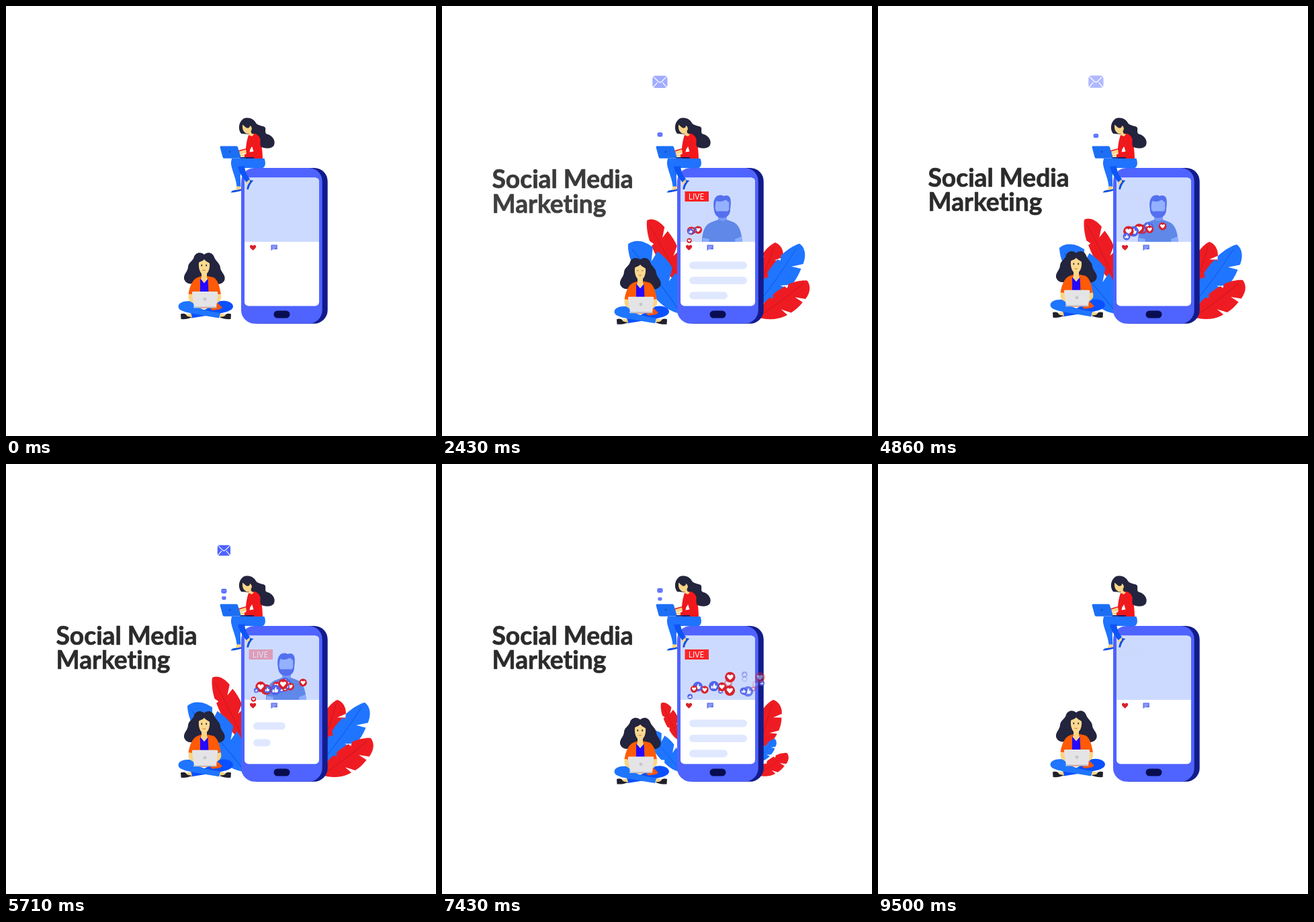
Write an HTML page that moves like this. It is 640 by 640 pixels and loops after 9.57 s.

```html
<!DOCTYPE html>
<html lang="en">
<head>
<meta charset="utf-8">
<title>Social Media Marketing</title>
<style>
html, body { margin: 0; width: 100%; height: 100%; overflow: hidden; background: #fff; }
svg { display: block; width: 100vw; height: 100vh; }
.title { font: 700 37.2px Lato, sans-serif; font-variant-ligatures: none; fill: #2b2b2b; stroke: #2b2b2b; stroke-width: .7; }
.live { font: 12px "Open Sans", sans-serif; fill: #fff; }
</style>
</head>
<body>
<svg viewBox="0 0 640 640">
  <defs>
    <clipPath id="photo"><path d="M355 351V262q0-6 6-6h99q6 0 6 6v89z"/></clipPath>
    <clipPath id="post"><rect x="355" y="351" width="111" height="95"/></clipPath>
    <path id="leafShape" d="M0 0C8-11 20-16 34-17L38-12L42-18C50-19 58-18 65-17L66-11L72-16C83-13 94-7 100 0C100 13 92 23 80 27L68 12L73 29C64 32 56 33 48 32L38 15L41 31C26 29 10 18 0 0Z"/>
    <path id="heart" d="M0 5.5C-4 2-6 0-6-2C-6-5-1.8-6 0-2.8C1.8-6 6-5 6-2C6 0 4 2 0 5.5Z"/>
    <path id="thumb" d="M-5.4-.6h2.8v5.2h-2.8zM-1.8 4V0L.4-5.6C2.6-5.6 2.3-2.6 1.8-1.2H4.8C5.8-1.2 5.8 0 5.4.8L4.2 4.6H-.8Z"/>
    <g id="like"><circle r="10" fill="#4f63ec"/><use href="#thumb" fill="#fff"/></g>
    <g id="love"><circle r="10" fill="#d9212c"/><use href="#heart" fill="#fff"/></g>
    <g id="mail">
      <rect x="-11" y="-9" width="22" height="18" rx="4.5" fill="#4f63ff"/>
      <path d="M-9-7L-2.4-.4Q0 1.6 2.4-.4L9-7M-9.5 7.5L-4 1M9.5 7.5L4 1" fill="none" stroke="#fff" stroke-width="1.2"/>
    </g>
  </defs>

  <g id="leaves"></g>

  <g id="phone">
    <rect x="356" y="241" width="122.7" height="231.7" rx="20" fill="#121b8c"/>
    <rect x="350" y="241" width="120.7" height="231.7" rx="20" fill="#4f63ff"/>
    <rect x="355" y="255.6" width="111" height="191" rx="6" fill="#fff"/>
    <path d="M355 351V262q0-6.4 6-6.4h99q6 0 6 6.4v89z" fill="#cddaff"/>
    <rect x="398.5" y="453.5" width="24" height="11" rx="5.5" fill="#080d50"/>
  </g>

  <g clip-path="url(#photo)"><g id="man">
    <path d="M387 352C387 334 392 324 403 321L411 318H424L432 321C442 324 446 336 447 352Z" fill="#5f88e8"/>
    <path d="M387.500 352L388.500 345L398 347L397.500 352ZM436.500 352L436 347L446 343L447 352Z" fill="#8aabff"/>
    <path d="M411 308H424V317C422 321 413 321 411 317Z" fill="#7898f5"/>
    <path d="M405.500 288H428.500V304C428 311 423 315 417 315C411 315 406 311 405.500 304Z" fill="#93b1ff"/>
    <path d="M404.800 303C403.500 294 404 288 408 284C411 281 416 281 419 283C423 281 428 282 429.300 287C430.500 293 429.500 298 429 303C429 309 426 315 417 315.500C408 315 405.500 309 404.800 303ZM406.800 302C407.500 306 410 306 412 305.500H422C424 306 426.500 306 427.300 302V292C424 291 424 288 421 289C416 292 411 291 408.500 290C407 293 406.500 297 406.800 302Z" fill="#5470ee" fill-rule="evenodd"/>
  </g></g>

  <g id="live">
    <rect x="361.500" y="276" width="35.500" height="15" fill="#fb2024"/>
    <text class="live" x="366.800" y="287.800">LIVE</text>
  </g>

  <g id="bars" clip-path="url(#post)" fill="#dfe8ff"></g>

  <use href="#heart" transform="translate(367.600 359.500) scale(.77)" fill="#d9202a"/>
  <path d="M394.500 355.500h9.300v6.800h-7l-2.300 2z" fill="#5a6cf0"/>
  <path d="M396 357.500h6.500M396 359.300h6.500M396 361h4.500" stroke="#cfd8ff" stroke-width=".7"/>

  <g id="reactions"></g>
  <g id="mails"></g>

  <g id="climber">
    <path d="M362 191C366 187 375 188 378 195C380 204 382 215 382 228H357C358 215 358 202 362 191Z" fill="#fb1519"/>
    <path d="M361 192C358.500 199 357.500 207 357 212L346 215L347 220L362 218L367 205L369 218L354 221L355 225L374 224C377 215 375 204 372 195Z" fill="#ee191d"/>
    <path d="M363.500 213L366.200 209L368.500 216.500L362.500 217.500Z" fill="#fff"/>
    <path d="M350 190C345 184 346 173 353 168C359 165 367 167 371 172.500C373 178 381 178 385 180C388 183 384 188 388 190.500C395 192 402 199 399 207C396 213 384 213 379 209C377 203 381 198 375 192.500C370 188 367 190 363 191Z" fill="#23243d"/>
    <path d="M352 176.500L358 181.500C361 182 363 181 363 178C366 179 367 184 364.500 186L365 189L369 191.500L366 194L362 192.500L361 190C356 191 351 186 352 176.500Z" fill="#f9d587"/>
    <path d="M352 177C350 182 353 188 358 190C352 191 347.500 185 347.500 178Z" fill="#23243d"/>
    <path d="M336 227H384.500C387 233 386.500 241 380 241.500L354 241C347 246 349 258 349.500 269L343.500 269C342 254 334 240 335 232Z" fill="#1f73ff"/>
    <path d="M345 239L355 238.500C356 248 360 254 363.500 258L357.800 262.500C352 255 347 248 345 239Z" fill="#0d55f5"/>
    <path d="M343.500 268.500H349.500L350 273L340 275.500C342 273 343 271 343.500 268.500ZM357.500 262.500L363 257.500L364 260L360 267.500Z" fill="#f9d587"/>
    <path d="M334.500 277.500C336 274.500 340 273.500 343 274L350 272.500V275C346 276 340 278 334.500 277.500ZM358.500 273C358.500 269 360 264.500 363 262L362.800 259L368.500 260C365 262 362 268 361 273Z" fill="#0b4fe0"/>
    <path d="M347 216.500L357 213.500L358 218.500L348 220.500ZM347.500 224L349 220.500L355 221L355 224.500Z" fill="#f9d587"/>
    <path d="M348 225H369V226.800H348Z" fill="#0d1c70"/>
    <path d="M320 208.500H343Q344.500 208.500 345 210L349.500 225Q349.500 226.800 348 226.800H324.500Q323 226.800 322.500 225L318.500 210Q318.500 208.500 320 208.500Z" fill="#1c6ff5"/>
    <circle cx="333" cy="217" r="1.500" fill="#1550c4"/>
  </g>

  <g id="sitter">
    <path d="M295 370C290 365 282 367 280 373C279 379 272 381 271 388C271 395 264 399 265 406C267 413 275 416 282 411L295 406L308 411C315 417 324 413 325.500 407C327 400 320 396 319 390C319 383 312 380 310 374C308 367 300 365 295 370Z" fill="#23243d"/>
    <path d="M285 404L291 402H300L309 404C316 408 318 419 320 429H312L311 450H279V430L271.500 429C273 420 276 408 285 404Z" fill="#ff5a05"/>
    <path d="M289 405L295 411L300.500 405L301.500 427H289Z" fill="#2408ff"/>
    <path d="M291 397H299V404L300.500 406L295 412.500L289.500 406L291 404Z" fill="#f9d587"/>
    <path d="M287 382C289 380 293 380 295 377C297 380 301 381 303 383C304 392 300 400 295 400.500C290 400 286 392 287 382Z" fill="#fbd98f"/>
    <path d="M292.500 393Q294.700 394.300 297 393" fill="none" stroke="#c7623f" stroke-width=".9"/>
    <g id="eyes" fill="#23243d"><ellipse cx="291.300" cy="386" rx=".9" ry="1.500"/><ellipse cx="298.200" cy="386" rx=".9" ry="1.500"/></g>
    <g id="lids" fill="none" stroke="#6b4a35" stroke-width=".7"><path d="M289.800 386q1.500.8 3 0M296.700 386q1.500.8 3 0"/></g>
    <path d="M313 441C325 436 338 440 338 447.500C337 455 322 457 304 460L276 464.500L274.500 457C288 455 302 452 313 441Z" fill="#0a50ff"/>
    <path d="M281 441C270 437 256.500 440 256.500 447.500C257 455 272 456.500 290 460L317 464.500L319.500 457C306 455 296 453 287 449Z" fill="#1f75ff"/>
    <path d="M304 451L315 442L322 449L318 451.500L308 453Z" fill="#f65510"/>
    <path d="M272 428.500L278.500 429.500L281 444L273.500 439C271 436 271 432 272 428.500ZM313.500 430L319.500 428.500C321.500 434 320.500 439 312.500 443Z" fill="#f9d587"/>
    <path d="M268 459L275.500 457.500L277 463.500L270 465ZM327 459L319 457.500L317.500 463.500L325 465Z" fill="#f9d587"/>
    <path d="M260 458.500C264 457 268 458 269 461C271 463 274 462 276.500 463.500C272 465.500 266 466.500 260.500 466ZM335 458.500C331 457 327 458 326 461C324 463 320 462 318 463.500C323 465.500 329 466.500 334.500 466Z" fill="#20202c"/>
    <path d="M279 447.500H313.500V449.500H279Z" fill="#c3c4c9"/>
    <path d="M278.500 425H313.500Q315.500 425 315.300 427L313.300 446.500Q313 447.800 312 447.800H281Q280 447.800 279.700 446.500L276.800 427Q276.700 425 278.500 425Z" fill="#e4e4e7"/>
    <circle cx="296" cy="436.300" r="2.400" fill="#c6c6ca"/>
  </g>

  <text id="line1" class="title" x="74.500" y="268.500">Social Media</text>
  <text id="line2" class="title" x="74.500" y="304.500">Marketing</text>
</svg>
<script>
const LOOP = 9570, FPS = 14;
const $ = id => document.getElementById(id);
const clamp = x => Math.min(1, Math.max(0, x));
const part = (t, from, to) => clamp((t - from) / (to - from));
const sine = u => .5 - .5 * Math.cos(Math.PI * u);
const outQuad = u => 1 - (1 - u) ** 2;
const outBack = u => 1 + 2.7 * (u - 1) ** 3 + 1.7 * (u - 1) ** 2;
const range = n => [...Array(n).keys()];

let seed = 11;
function random(min, max) {
  seed = seed * 16807 % 2147483647;
  return min + (max - min) * seed / 2147483647;
}

// Eased value from [time, value] pairs that span the loop.
function track(keys, t) {
  const i = keys.findIndex(key => t < key[0]);
  const [t0, a] = keys[i - 1], [t1, b] = keys[i];
  return a + (b - a) * sine(part(t, t0, t1));
}

function place(el, transform, opacity = 1) {
  el.setAttribute('transform', transform);
  el.setAttribute('opacity', opacity.toFixed(3));
}

function fill(id, items, markup) {
  $(id).innerHTML = items.map(markup).join('');
  items.forEach((item, i) => item.el = $(id).children[i]);
  return items;
}

function leaf(color, [x, y], [tipX, tipY], width, sway, out) {
  return {
    color, x, y, width, sway, out,
    length: Math.hypot(tipX - x, tipY - y) / 100,
    angle: Math.atan2(tipY - y, tipX - x) * 180 / Math.PI
  };
}

const RED = ['#ee1c22', '#c4141c'], BLUE = ['#1f75ff', '#0f58e0'];
const leaves = fill('leaves', [
  leaf(RED, [354, 412], [307, 318], .68, 2, 7.1),
  leaf(BLUE, [356, 458], [270, 360], .98, -7, 7.1),
  leaf(RED, [468, 425], [493, 351], .7, -4, 7.9),
  leaf(BLUE, [470, 443], [534, 355], .8, 2, 7),
  leaf(RED, [470, 463], [543, 408], .76, -1, 7.1)
], l => `<g><use href="#leafShape" fill="${l.color[0]}"/><path d="M0 0Q50 4 92 0" fill="none" stroke="${l.color[1]}"/></g>`);

function drawLeaves(t) {
  const swing = Math.cos(2.75 * (t - 1.29)) * (1 - part(t, 1.3, 3.9));
  const grow = t < .45 ? 0 : outBack(part(t, .45, 1.2));
  for (const l of leaves) {
    const s = grow * (1 - sine(part(t, l.out, l.out + .75)));
    place(l.el, `translate(${l.x} ${l.y}) rotate(${l.angle + l.sway * swing}) scale(${s * l.length} ${s * l.width})`, s > .02 ? 1 : 0);
  }
}

const bars = fill('bars', [{ w: 86 }, { w: 86 }, { w: 57 }], (bar, i) =>
  `<rect x="368" y="${380.6 + 22.5 * i}" width="${bar.w}" height="10.8" rx="5.4"/>`);

function drawBars(t) {
  const u = t > 4.6 ? t - 4.9 : t;
  bars.forEach(({ el, w }, i) => {
    const p = outQuad(part(u - i * .17, .48, 1.48));
    const gone = Math.max(0, u - 2.8 - i * .17);
    el.setAttribute('width', w * p);
    place(el, `translate(0 ${9 * (1 - p) - 54 * gone * gone})`, p > .02 ? 1 - clamp(gone / .9) ** 2 : 0);
  });
}

// Later reactions drift faster and live shorter.
const reactions = fill('reactions', range(21).map(i => {
  const birth = .65 + i * .33;
  return {
    birth,
    kind: i % 2 ? 'love' : 'like',
    speed: 3.5 + 2.6 * birth + random(-4, 3),
    slope: random(-.3, .12),
    r: random(3.5, 8),
    end: 6.8 + .27 * birth + random(0, .6)
  };
}), ({ kind }) => `<use href="#${kind}"/>`);

function drawReactions(t) {
  for (const { el, birth, speed, slope, r, end } of reactions) {
    const age = Math.max(0, t - birth);
    const dx = speed * age ** 1.43;
    const lift = 23 * (1 - clamp(age / .6)) ** 2;
    place(el, `translate(${367.5 + dx} ${335 + slope * dx + lift}) scale(${r / 10 * clamp(age / .2)})`, age ? clamp((end - t) / .8) : 0);
  }
}

const mails = fill('mails', [.17, .79, 1.99, 3.2, 4.45, 5.24, 5.44, 6.94, 7.19].map(start => ({ start })),
  () => '<use href="#mail"/>');

function drawMails(t) {
  for (const { el, start } of mails) {
    const u = part(t, start, start + 1.75);
    const rise = sine(u);
    place(el, `translate(324.4 ${205 - 93 * rise}) scale(${.23 + .79 * rise})`, u > 0 ? clamp((1 - u) / .12) : 0);
  }
}

function drawTitle(t) {
  ['line1', 'line2'].forEach((id, i) => {
    const decay = start => Math.exp(-1.9 * Math.max(0, t - start - i * .215));
    const rest = decay(1), stay = decay(7.75);
    place($(id), `translate(0 ${40 * rest - 14 * (1 - stay)})`, (1 - rest) * Math.max(0, 1.08 * stay - .08));
  });
}

const bob = [[0, 0], [1.8, 8.8], [4.9, -2.2], [7.4, 10.5], [9.6, 0]];

function draw(t) {
  drawLeaves(t);
  drawBars(t);
  drawReactions(t);
  drawMails(t);
  drawTitle(t);
  const sink = 72 * (1 - part(t, .8, 2.4)) ** 2 + 75 * part(t, 6, 7.4) ** 2;
  place($('man'), `translate(0 ${sink})`);
  place($('live'), '', sine(4 * t * 1000 / LOOP));
  place($('sitter'), `translate(0 ${track(bob, t)})`);
  const shut = t > 2.3 && t < 2.55;
  place($('eyes'), '', shut ? 0 : 1);
  place($('lids'), '', shut ? 1 : 0);
}

function tick() {
  const ms = Math.floor(performance.now() % LOOP / 10) * 10;
  draw(Math.floor((ms + 5) * FPS / 1000) / FPS);
  requestAnimationFrame(tick);
}
tick();
</script>
</body>
</html>
```
